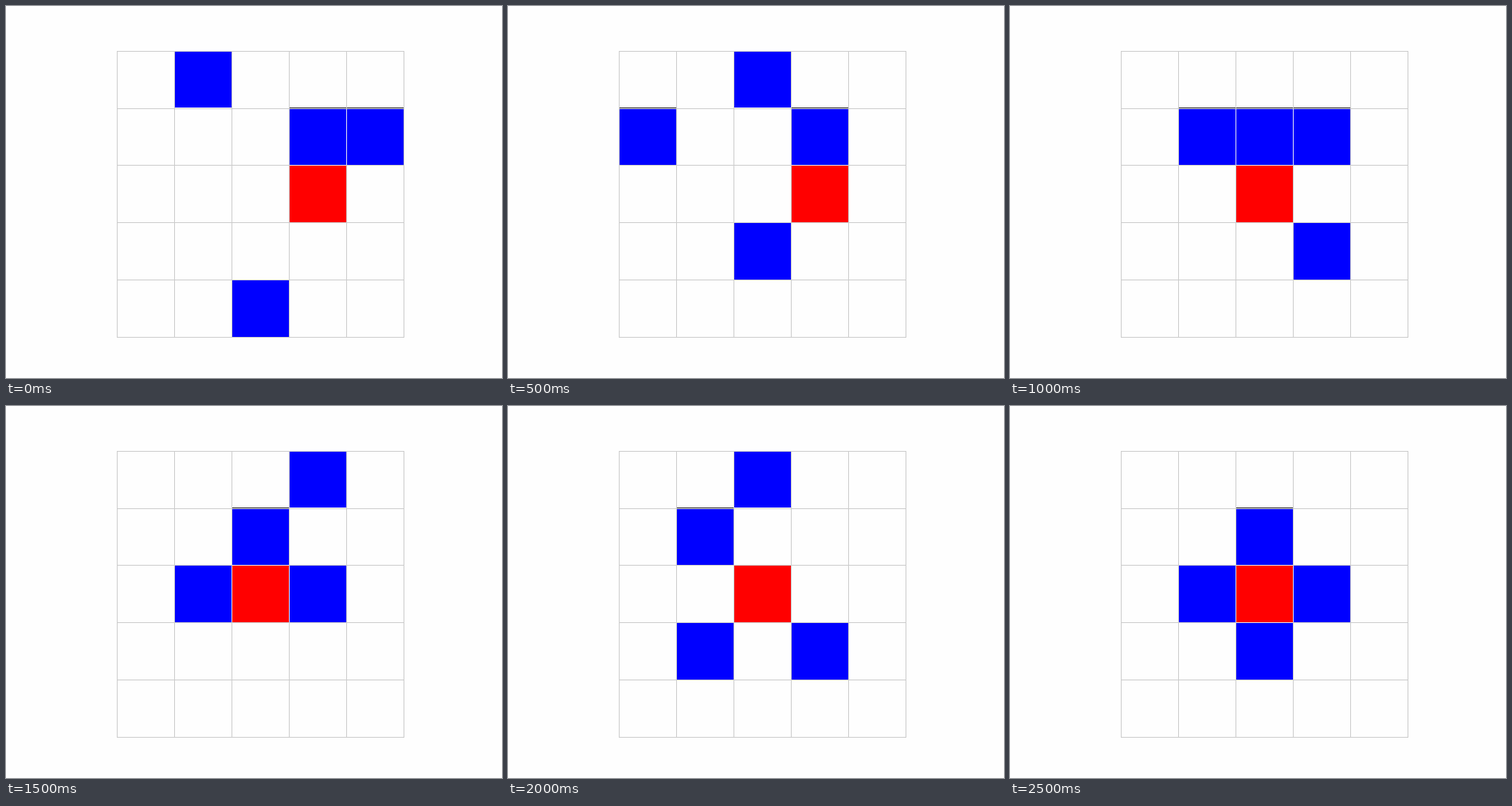
These frames come from a looping animation (640x480 px, 3 s). An HTML page:

```html
<!DOCTYPE html>
<html lang="en">
<head>
<meta charset="utf-8">
<title>Pursuit on a grid</title>
<style>
html, body { margin: 0; width: 100%; height: 100%; overflow: hidden; background: #fefefe; }
svg { display: block; width: 640px; height: 480px; }
</style>
</head>
<body>
<svg viewBox="0 0 640 480" shape-rendering="crispEdges">
  <g id="grid"></g>
  <g id="cells"></g>
</svg>
<script>
const STEP_MS = 500;
const BLUE = "#0000ff", RED = "#ff0000", LINE = "#cccccc", SEAM = "#e6e6ee", EDGE = "#202020";
const xs = [143, 217, 291, 365, 439, 513];
const ys = [58, 132, 205, 279, 353, 427];

// Each step: four hunters, then the prey, as "row column".
const steps = [
  "01 13 14 42 23",
  "02 10 13 32 23",
  "11 12 13 33 22",
  "03 12 21 23 22",
  "02 11 31 33 22",
  "12 21 23 32 22"
].map(s => s.split(" "));

const rect = (x, y, w, h, fill) =>
  `<rect x="${x}" y="${y}" width="${w}" height="${h}" fill="${fill}"/>`;

document.getElementById("grid").innerHTML =
  xs.map(x => rect(x, 58, 1, 370, LINE)).join("") +
  ys.map(y => rect(143, y, 371, 1, LINE)).join("");

function drawCell(cell, i, all) {
  const [r, c] = [...cell].map(Number);
  const x = xs[c] + 1, y = ys[r] + 1;
  const w = xs[c + 1] - x, h = ys[r + 1] - y - (r === 0 ? 1 : 0);
  const taken = (row, col) => all.includes(`${row}${col}`);
  let out = rect(x, y, w, h, i === 4 ? RED : BLUE);
  if (taken(r, c - 1)) out += rect(x - 1, y, 1, h, SEAM);
  if (r === 1 || taken(r - 1, c)) out += rect(x, y - 1, w, 1, SEAM);
  if (r === 1) out += rect(x, y - 2, w, 1, EDGE);
  return out;
}

const cells = document.getElementById("cells");
let shown = -1;

function render(ms) {
  const k = Math.floor(ms / STEP_MS) % steps.length;
  if (k === shown) return;
  shown = k;
  cells.innerHTML = steps[k].map(drawCell).join("");
}

const start = performance.now();
function tick() {
  render(performance.now() - start);
  requestAnimationFrame(tick);
}
tick();
</script>
</body>
</html>
```
